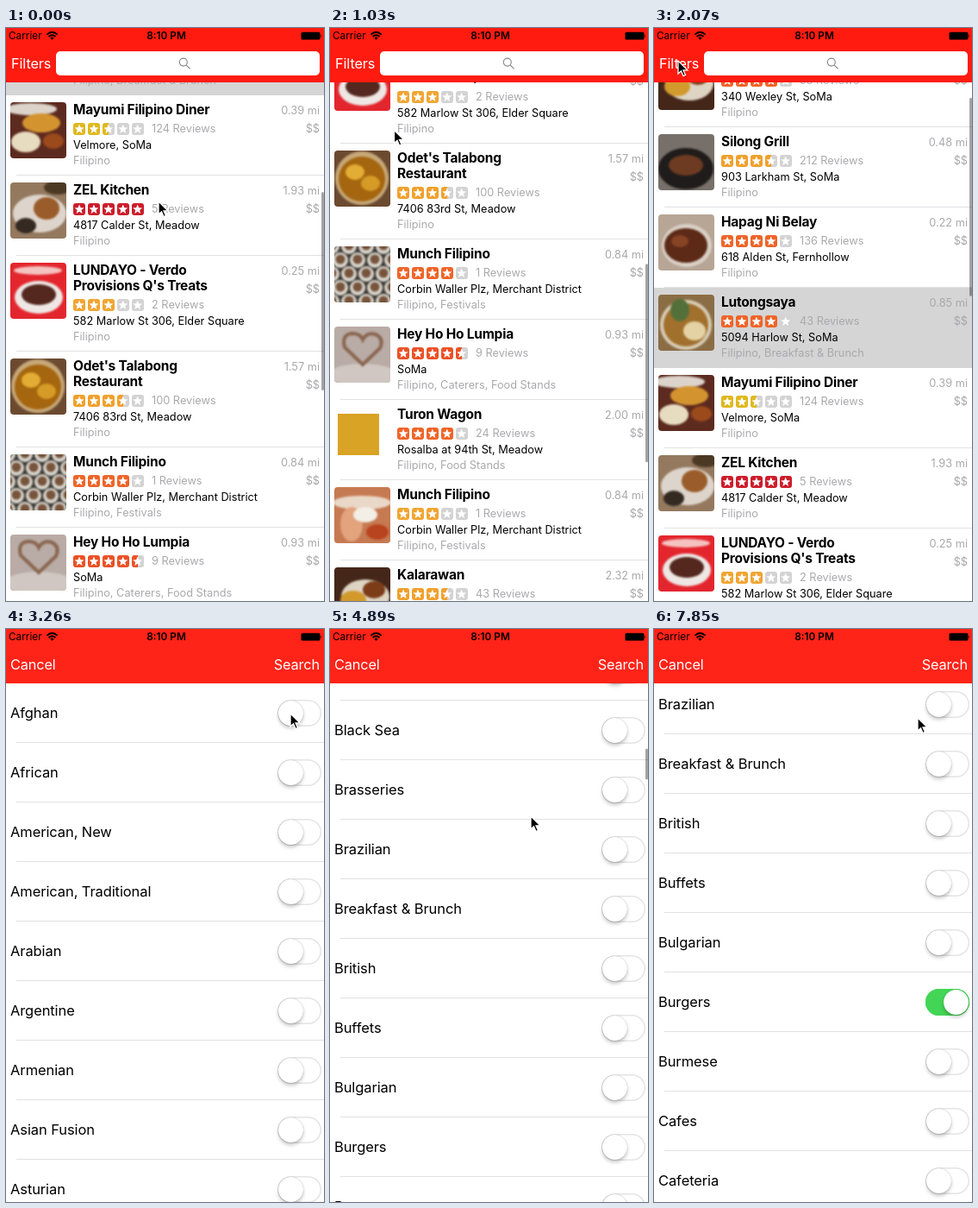
An HTML page that plays this animation: 369 by 664 pixels, repeating every 8 s.

```html
<!DOCTYPE html>
<html lang="en">
<head>
<meta charset="utf-8">
<title>Restaurant finder</title>
<style>
html, body { margin: 0; width: 100%; height: 100%; overflow: hidden; background: #fff; }
#stage { position: relative; width: 369px; height: 664px; overflow: hidden; background: #fff;
  font: 12.75px/18px Inter, Roboto, sans-serif; color: #000; white-space: nowrap; }
#stage div, #stage svg, .bar span, .status span { position: absolute; }
.screen { inset: 0; background: #fff; overflow: hidden; }
.list { left: 0; top: 63px; width: 369px; will-change: transform; }
.list .row { position: relative !important; width: 369px; }
.row::after { content: ""; position: absolute; left: 12px; right: 0; bottom: 0; height: 1px; background: #e1e1e4; }
.bar { left: 0; top: 0; width: 369px; height: 63px; background: #ff1b10; color: #fff;
  font-size: 16.3px; letter-spacing: -.12px; }
.bar span { top: 32px; }
#filters .bar { background: #ff2318; }
.field { left: 58px; top: 27px; width: 306px; height: 28px; border-radius: 5px; background: #fff; }
.status { left: 0; top: 0; width: 369px; height: 20px; font-size: 11.8px; }
.status span { top: 0; }
.thumb { left: 5px; top: 8px; width: 65px; height: 65px; border-radius: 4px; overflow: hidden; }
.thumb svg { left: 0; top: 0; }
.soft { filter: blur(.9px); }
.name { left: 78px; top: 8px; font-weight: 700; font-size: 15.5px; line-height: 17.6px; letter-spacing: -.23px; }
.grey { color: #a9a9ad; }
.right { right: 5px; }
.info { left: 78px; width: 200px; }
.stars { top: 32px; display: flex; gap: 2.6px; }
.stars i { width: 14.3px; height: 14.3px; border-radius: 3px; }
.stars i::after { content: ""; display: block; width: 11px; height: 11px; margin: 1.4px 1.6px; background: #fff;
  clip-path: polygon(50% 0, 64% 35%, 100% 38%, 72% 61%, 81% 97%, 50% 77%, 19% 97%, 28% 61%, 0 38%, 36% 35%); }
.picked { background: #d5d5d5; }
.picked::after { display: none; }
.kind { left: 5px; top: 25px; font-size: 16.5px; letter-spacing: -.1px; }
.switch { left: 315px; top: 18.5px; width: 51px; height: 31px; border-radius: 16px; background: #fff;
  box-shadow: inset 0 0 0 1.5px #e4e4e4; }
.knob { left: 1px; top: 1px; width: 29px; height: 29px; border-radius: 50%; background: #fff;
  box-shadow: 0 3px 4px rgba(0,0,0,.22), 0 0 1px rgba(0,0,0,.35); }
.thumbbar { left: 366px; top: 0; width: 2.5px; border-radius: 2px; background: rgba(0,0,0,.36); }
#cursor { left: -2px; top: -2px; }
</style>
</head>
<body>
<div id="stage">
  <div class="screen" id="places">
    <div class="list"></div>
    <div class="thumbbar" style="height:230px"></div>
    <div class="bar">
      <span style="left:6px">Filters</span>
      <div class="field"></div>
      <svg style="left:200px;top:34px" width="15" height="15" fill="none" stroke="#85858a" stroke-width="1.1">
        <circle cx="5.8" cy="5.6" r="4.5"/><path d="M9.1 8.9L13.6 13.3"/>
      </svg>
    </div>
  </div>
  <div class="screen" id="filters">
    <div class="list"></div>
    <div class="thumbbar" style="height:36px"></div>
    <div class="bar"><span style="left:5px">Cancel</span><span style="right:5px">Search</span></div>
  </div>
  <div class="status">
    <span style="left:3px">Carrier</span>
    <svg style="left:46px;top:3px" width="15" height="12" fill="none" stroke="#000" stroke-width="1.9">
      <path d="M1.4 4.6Q7.5 -1 13.6 4.6M3.6 7Q7.5 3.5 11.4 7"/><path d="M5.3 8.3Q7.5 6.6 9.7 8.3L7.5 10.8Z" fill="#000" stroke="none"/>
    </svg>
    <span style="left:0;width:372px;text-align:center;font-weight:600">8:10 PM</span>
    <svg style="left:342px;top:4px" width="26" height="11"><rect x=".5" y=".8" width="22" height="8.8" rx="1.6"/><path d="M23.4 3.3q1.6 1.9 0 3.8z"/></svg>
  </div>
  <svg id="cursor" width="17" height="23">
    <path transform="translate(2 2)" d="M0 0V15L3.5 11.8L6 17.6L8.5 16.5L6 10.9H10.9Z" stroke="#fff" stroke-width="1.3"/>
  </svg>
</div>
<script>
const $ = s => document.querySelector(s);

// Thumbnails: base colour, then ellipses as "colour cx cy rx ry".
const THUMBS = {
  noodles: ["#5d2a1f", "#dcd4ca 24 8 30 7", "#d3942f 36 24 22 11", "#e8dcc0 18 46 17 12", "#9b4a1c 50 45 12 9"],
  plate: ["#94795f", "#ddd5cb 34 36 31 22", "#342a22 18 50 12 9", "#9a5c2a 42 30 15 13", "#4c3924 55 6 16 8"],
  red: ["#e3262e", "#f4c3c0 32 9 28 5", "#eee7e4 33 40 28 19", "#54281f 33 37 20 12"],
  curry: ["#6b4a30", "#c7a878 32 32 31 31", "#a5660f 32 33 27 26", "#e3ac35 24 25 11 9", "#d59b26 42 38 11 9"],
  heart: ["#b9aca6", "#d0c7c2 33 56 40 13"],
  cream: ["#c67a52", "#e9d7c8 32 18 34 8", "#e2a37d 20 43 13 20", "#f3efe6 36 32 14 9", "#b8431f 50 52 13 9"],
  dinner: ["#45271a", "#ded4c3 36 34 28 20", "#d29a2d 22 38 15 11", "#7d3c18 46 26 13 10"],
  stew: ["#b7a595", "#d9d0c6 33 36 29 25", "#5c2a17 32 36 25 20", "#874324 25 31 10 7"],
  soup: ["#8b6d45", "#d8cdb6 32 35 30 29", "#a1702c 32 35 26 25", "#e4d2a5 42 42 13 11", "#54703a 25 18 11 13"],
  grill: ["#77706a", "#1f1c1b 32 40 32 24", "#6c3b21 32 36 20 12"],
  cups: ["#3b3732"],
  badge: ["#fff"]
};

function thumb(key) {
  const [base, ...blobs] = THUMBS[key];
  let art = blobs.map(b => {
    const [c, x, y, rx, ry] = b.split(" ");
    return `<ellipse cx="${x}" cy="${y}" rx="${rx}" ry="${ry}" fill="${c}"/>`;
  }).join("");
  if (key === "cups") {
    for (let i = 0; i < 20; i++) {
      const x = (i % 4) * 20 + (i >> 2) % 2 * 10 - 3, y = (i >> 2) * 16;
      art += `<circle cx="${x}" cy="${y}" r="9" fill="#d8d5cd"/><circle cx="${x}" cy="${y - 1}" r="5.5" fill="#77543c"/>`;
    }
  }
  if (key === "heart") {
    art += '<path d="M33 44L12 24Q8 9 21 8Q30 8 33 15Q38 6 48 9Q58 14 53 25Z" fill="none" stroke="#8a6650" stroke-width="4"/>';
  }
  if (key === "badge") art = '<rect x="4" y="8" width="48" height="48" fill="#d9a325"/>';
  return `<div class="thumb" style="background:${base}"><svg width="65" height="65"><g class="${key === "badge" ? "" : "soft"}">${art}</g></svg></div>`;
}

const STAR_COLORS = { 2.5: "#dfb81f", 3: "#f0a533", 3.5: "#f0a02c", 4: "#ef6428", 4.5: "#ea5126", 5: "#cc1d2b" };
function stars(n) {
  return [0, 1, 2, 3, 4].map(i => {
    const fill = Math.max(0, Math.min(1, n - i)) * 100;
    return `<i style="background:linear-gradient(90deg,${STAR_COLORS[n]} ${fill}%,#d3d3d3 ${fill}%)"></i>`;
  }).join("");
}

// name | rating | reviews | miles | address | category | thumbnail
const PLACES = `Balay Orosa|4|58|0.61|340 Wexley St, SoMa|Filipino|dinner
Silong Grill|3.5|212|0.48|903 Larkham St, SoMa|Filipino|grill
Hapag Ni Belay|4|136|0.22|618 Alden St, Fernhollow|Filipino|stew
Lutongsaya|4|43|0.85|5094 Harlow St, SoMa|Filipino, Breakfast & Brunch|soup
Mayumi Filipino Diner|2.5|124|0.39|Velmore, SoMa|Filipino|noodles
ZEL Kitchen|5|5|1.93|4817 Calder St, Meadow|Filipino|plate
LUNDAYO - Verdo<br>Provisions Q's Treats|3|2|0.25|582 Marlow St 306, Elder Square|Filipino|red
Odet's Talabong<br>Restaurant|3.5|100|1.57|7406 83rd St, Meadow|Filipino|curry
Munch Filipino|4|1|0.84|Corbin Waller Plz, Merchant District|Filipino, Festivals|cups
Hey Ho Ho Lumpia|4.5|9|0.93|SoMa|Filipino, Caterers, Food Stands|heart
Turon Wagon|4|24|2.00|Rosalba at 94th St, Meadow|Filipino, Food Stands|badge
Munch Filipino|3|1|0.84|Corbin Waller Plz, Merchant District|Filipino, Festivals|cream
Kalarawan|3.5|43|2.32|2715 Dunmore St, Meadow|Filipino|dinner
Bahay Luntian|4|77|2.41|1180 Harlow St, SoMa|Filipino|soup
Tanglaw Cafe|3.5|31|2.56|64 Brindle Ave, Meadow|Filipino|stew
Hain Sa Burol|4|18|2.78|930 Calder St, Meadow|Filipino|plate
Mesa Dalisay|3|12|3.05|415 Alden St, Fernhollow|Filipino|curry`.split("\n").map(l => l.split("|"));

$("#places .list").innerHTML = PLACES.map(([name, rating, reviews, miles, address, kind, pic], i) => {
  const extra = name.includes("<br>") ? 18 : 0;
  return `<div class="row ${i === 3 ? "picked" : ""}" style="height:${93 + extra}px">${thumb(pic)}
    <div class="name">${name}</div>
    <div class="grey right" style="top:9px">${miles} mi</div><div class="grey right" style="top:30px">$$</div>
    <div class="info" style="top:${extra}px">
      <div class="stars">${stars(+rating)}</div>
      <div class="grey" style="left:91px;top:30px">${reviews} Reviews</div>
      <div style="top:49px">${address}</div><div class="grey" style="top:67px">${kind}</div>
    </div></div>`;
}).join("");

const KINDS = ("Afghan|African|American, New|American, Traditional|Arabian|Argentine|Armenian|Asian Fusion|Asturian|" +
  "Australian|Austrian|Baguettes|Bangladeshi|Barbeque|Basque|Bavarian|Beer Garden|Beer Hall|Beisl|Belgian|Bistros|" +
  "Black Sea|Brasseries|Brazilian|Breakfast & Brunch|British|Buffets|Bulgarian|Burgers|Burmese|Cafes|Cafeteria|" +
  "Cajun/Creole|Cambodian").split("|");
$("#filters .list").innerHTML = KINDS.map(k =>
  `<div class="row" style="height:69px"><div class="kind">${k}</div><div class="switch"><div class="knob"></div></div></div>`).join("");
const toggle = document.querySelectorAll(".switch")[KINDS.indexOf("Burgers")];

// Motion is sampled on a coarse beat, like a low-rate screen capture.
const LOOP = 8000, BEATS = 54;
const CURSOR = [[0, 177, 201], [2, 180, 120], [4, 170, 160], [6, 140, 300], [7, 74.5, 118.5], [8, 50, 75], [9, 36, 50],
  [11, 28, 38], [18, 28, 38], [20, 190, 70], [22, 330, 98], [25, 330, 98], [26, 262, 400], [28, 236, 200], [31, 233, 217],
  [35, 233, 217], [39, 268, 477], [40, 268, 470], [41, 269, 432], [42, 278, 346], [43, 285, 308], [45, 285, 308],
  [48, 343, 432], [50, 343, 432], [52, 318, 180], [53, 306, 103]];
const DRAG = [[0, 0], [1, 90], [2, 260], [3, 440], [4, 560], [5, 590], [6, 463], [7, 241]];
const KIND_SCROLL = [[25, 0], [26, 60], [27, 300], [28, 600], [29, 850], [30, 1060], [31, 1230], [32, 1360], [33, 1429],
  [35, 1429], [40, 1436], [41, 1474], [42, 1560], [43, 1597]];
const SHEET = [[16, 664], [17, 470], [18, 190], [19, 55], [20, 0]];
const PLACE_BAR = [[16, 1], [18, 0]];
const KIND_BAR = [[25, 0], [26, 1], [35, 1], [37, 0], [39, 0], [40, 1], [45, 1], [47, 0]];
const TOGGLE = [[50, 0], [51, .35], [52, .85], [53, 1]];

function at(track, b, col = 1) {
  const i = track.findIndex(k => k[0] > b);
  if (i === 0) return track[0][col];
  if (i < 0) return track[track.length - 1][col];
  const p = track[i - 1], q = track[i];
  return p[col] + (q[col] - p[col]) * (b - p[0]) / (q[0] - p[0]);
}

// Drag, then a flick that coasts back to the top of the list.
const TOP = -357;
const placeScroll = b => b < 7 ? at(DRAG, b) : Math.max(TOP, -394 + 635 * Math.exp(-.3003 * (b - 7)));

const move = (el, x, y) => { el.style.transform = `translate(${x}px,${y}px)`; };
const parts = ["#places .list", "#places .thumbbar", "#filters", "#filters .list", "#filters .thumbbar", "#cursor"].map($);

function draw(b) {
  const [places, placeBar, sheet, kinds, kindBar, cursor] = parts;
  const s = placeScroll(b), k = at(KIND_SCROLL, b), on = at(TOGGLE, b);
  move(places, 0, Math.round(TOP - s));
  move(placeBar, 0, 190 + s * .3455);
  placeBar.style.opacity = at(PLACE_BAR, b);
  move(sheet, 0, at(SHEET, b));
  move(kinds, 0, -Math.round(k));
  move(kindBar, 0, 65 + k * .0515);
  kindBar.style.opacity = at(KIND_BAR, b);
  move(cursor, at(CURSOR, b, 1), at(CURSOR, b, 2));
  move(toggle.firstChild, 20 * on, 0);
  toggle.style.background = `rgba(67,214,86,${on})`;
  toggle.style.boxShadow = `inset 0 0 0 1.5px ${on ? `rgba(67,214,86,${on})` : "#e4e4e4"}`;
}

const start = performance.now();
function tick() {
  const t = (performance.now() - start) % LOOP;
  draw(Math.min(BEATS - 1, Math.floor((t + 8) / LOOP * BEATS)));
  requestAnimationFrame(tick);
}
tick();
</script>
</body>
</html>
```
